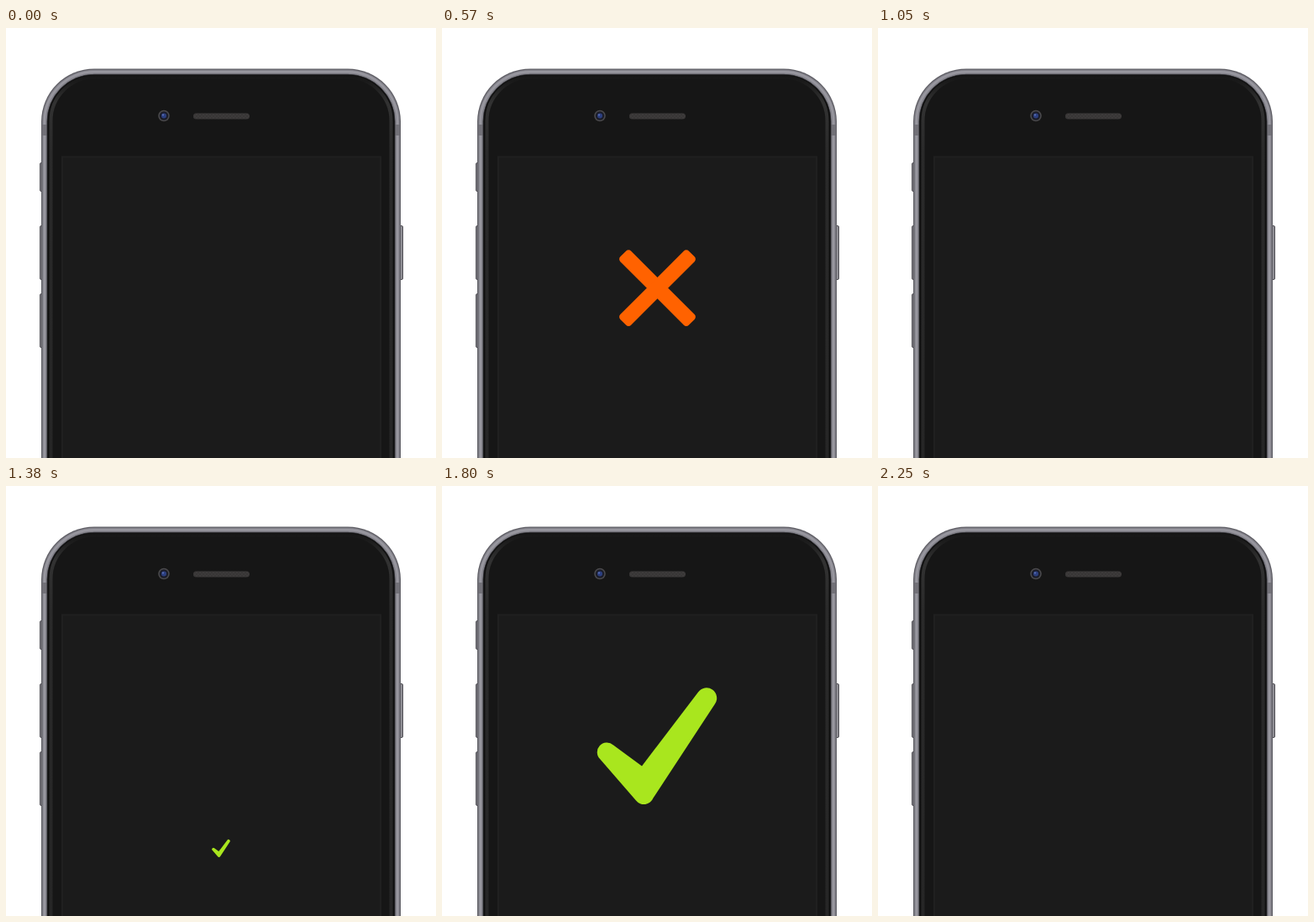
Write an HTML page that moves like this. It is 512x512 px and loops after 2700 ms.

```html
<!DOCTYPE html>
<html lang="en">
<head>
<meta charset="utf-8">
<title>Phone status</title>
<style>
  html, body { margin: 0; width: 100%; height: 100%; overflow: hidden; background: #fff; }
  svg { display: block; width: 100%; height: 100%; }
</style>
</head>
<body>
<svg viewBox="0 0 512 512">
  <defs>
    <linearGradient id="sheen" gradientUnits="userSpaceOnUse" x1="0" y1="57" x2="0" y2="512">
      <stop offset="0" stop-color="#161616"/>
      <stop offset=".02" stop-color="#1c1c1c"/>
      <stop offset=".07" stop-color="#323232"/>
      <stop offset=".2" stop-color="#2a2a2a"/>
      <stop offset="1" stop-color="#262626"/>
    </linearGradient>
    <linearGradient id="button">
      <stop offset="0" stop-color="#66656b"/>
      <stop offset=".5" stop-color="#a5a4aa"/>
      <stop offset="1" stop-color="#77767c"/>
    </linearGradient>
    <pattern id="mesh" width="4" height="4" patternUnits="userSpaceOnUse">
      <rect width="4" height="4" fill="#383636"/>
      <path d="M0 1h2M2 3h2" stroke="#424040"/>
    </pattern>
  </defs>

  <g fill="url(#button)" stroke="#55545a">
    <rect x="40.5" y="160.5" width="6" height="34" rx="1.5"/>
    <rect x="40.5" y="235.5" width="6" height="64" rx="1.5"/>
    <rect x="40.5" y="316.5" width="6" height="64" rx="1.5"/>
    <rect x="466.5" y="235.5" width="6" height="64" rx="1.5"/>
  </g>

  <rect x="42" y="48.5" width="428" height="600" rx="63" fill="#5f5e65"/>
  <rect x="43.3" y="49.8" width="425.4" height="600" rx="61.7" fill="#84838b"/>
  <rect x="45.8" y="52.3" width="420.4" height="600" rx="59.2" fill="none" stroke="#98979f" stroke-width="2.4"/>
  <path d="M43 115h7v13h-7zM462 115h7v13h-7z" fill="#727178"/>
  <rect x="49" y="55.3" width="414" height="600" rx="56" fill="#161616" stroke="#3a3a3f"/>
  <rect x="50.5" y="56.8" width="411" height="600" rx="54.5" fill="none" stroke="#101010" stroke-width="2"/>
  <rect x="53.5" y="58.5" width="405" height="600" rx="52" fill="none" stroke="url(#sheen)" stroke-width="4"/>

  <rect x="67" y="153.5" width="379" height="400" fill="#1b1b1b" stroke="#202020" stroke-width="2"/>

  <circle cx="188" cy="104.5" r="6.8" fill="#4b4a4c"/>
  <circle cx="188" cy="104.5" r="5.2" fill="#1b1d29"/>
  <circle cx="188" cy="104.5" r="3" fill="#2c3f80"/>
  <circle cx="187" cy="103.5" r="1" fill="#6278ba"/>
  <rect x="223" y="101.5" width="67" height="7" rx="3.5" fill="url(#mesh)"/>

  <g id="cross" fill="#ff6200">
    <rect x="172.7" y="295.4" width="167.6" height="26.2" rx="6" transform="rotate(45 256.5 308.5)"/>
    <rect x="172.7" y="295.4" width="167.6" height="26.2" rx="6" transform="rotate(-45 256.5 308.5)"/>
  </g>
  <path id="check" fill="#a9e61e" d="M204 308.5L238 333.5L305 245.5A12.2 12.2 0 0 1 325 259.5L251.5 371.5A12 12 0 0 1 231 374.5L188.5 325.5A11.5 11.5 0 0 1 204 308.5Z"/>
</svg>
<script>
const LOOP = 2700, TICK = 30, ENTER = 600, FADE = 150, RISE = 155, MIN_SCALE = 0.1;

const marks = [
  { el: document.getElementById('cross'), x: 256.5, y: 308.5, start: 0, end: 1050 },
  { el: document.getElementById('check'), x: 256, y: 310, start: 1200, end: 2250 }
];

const smooth = p => p * p * (3 - 2 * p);
const surge = p => 1 - (1 - p ** 1.7) ** 0.426;

function place({ el, x, y, start, end }, t) {
  const visible = t > start && t < end;
  el.style.display = visible ? '' : 'none';
  if (!visible) return;
  const p = Math.min(1, (t - start) / ENTER);
  const scale = MIN_SCALE + (1 - MIN_SCALE) * surge(p);
  const drop = RISE * (1 - smooth(p));
  el.setAttribute('transform', `translate(${x} ${y + drop}) scale(${scale}) translate(${-x} ${-y})`);
  el.setAttribute('opacity', Math.min(1, (end - t) / FADE));
}

function draw(now) {
  const t = Math.floor(now % LOOP / TICK) * TICK;
  marks.forEach(mark => place(mark, t));
  requestAnimationFrame(() => draw(performance.now()));
}
draw(performance.now());
</script>
</body>
</html>
```
